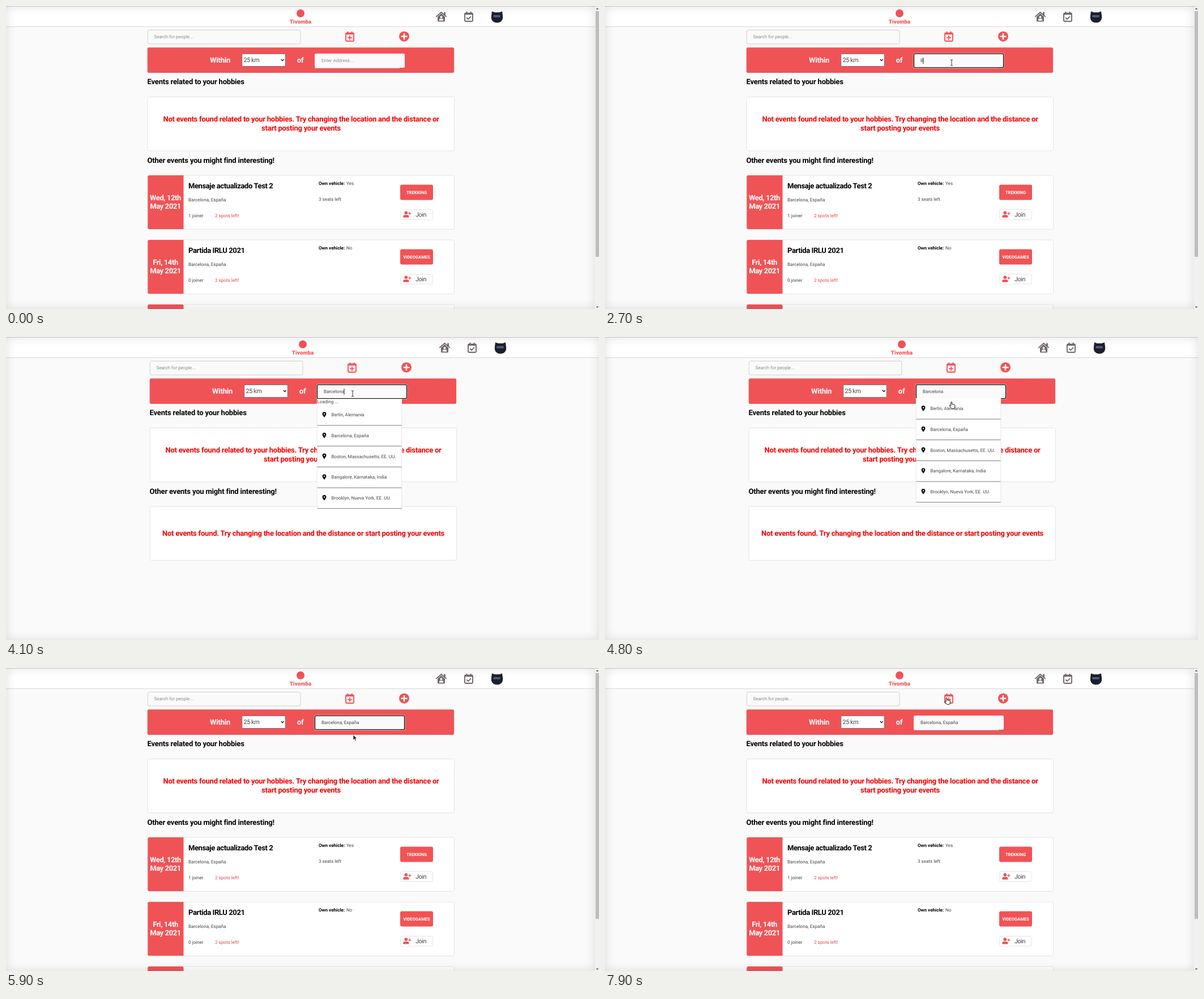
An HTML page that plays this animation: 1047x535 px, repeating every 8 s.

```html
<!DOCTYPE html>
<html lang="en">
<head>
<meta charset="utf-8">
<title>Event search</title>
<style>
  html, body { margin: 0; width: 100%; height: 100%; overflow: hidden; background: #fafafa; }
  svg { display: block; position: absolute; left: 0; top: 0; }
  #shade { position: absolute; left: 0; top: 0; height: 535px; box-shadow: inset 0 0 18px rgba(0,0,0,.13); }
  text { font-family: Roboto, Arial, sans-serif; white-space: pre; text-rendering: geometricPrecision; }
  .head, .alert, .bar { font-size: 13px; font-weight: 700; letter-spacing: -.18px; }
  .alert { fill: #f40000; letter-spacing: -.24px; }
  .bar { fill: #fff; }
  .title, .date { font-size: 13px; font-weight: 700; letter-spacing: -.4px; }
  .date { fill: #fff; }
  .small { font-size: 8.1px; fill: #444; }
  .hint { font-size: 8px; fill: #8a8a8a; }
  .left { font-size: 8.1px; fill: #f04040; }
  .own { font-size: 8.1px; font-weight: 700; }
  .tag { font-size: 7.6px; font-weight: 700; fill: #fff; }
  .big { font-size: 10.8px; fill: #444; letter-spacing: -.4px; }
  .brand { font-size: 9.6px; font-weight: 900; fill: #f05356; letter-spacing: .1px; }
</style>
</head>
<body>
<svg id="stage" width="1047" height="535" viewBox="0 0 1047 535"></svg>
<div id="shade"></div>
<script>
const LOOP = 8000, STEP = 100;
const RED = '#f05356', GREY = '#6f686a', LINE = '#dedede';

const rect = (x, y, w, h, fill, extra = '') =>
  `<rect x="${x}" y="${y}" width="${w}" height="${h}" fill="${fill}" ${extra}/>`;
const box = (x, y, w, h, fill = '#fff', stroke = LINE, r = 3) =>
  rect(x, y, w, h, fill, `stroke="${stroke}" stroke-width=".8" rx="${r}"`);
const circle = (x, y, r, fill) => `<circle cx="${x}" cy="${y}" r="${r}" fill="${fill}"/>`;
const text = (x, y, cls, str, anchor = 'start', id = '') =>
  `<text x="${x}" y="${y}" class="${cls}" text-anchor="${anchor}" ${id && `id="${id}"`}>${str}</text>`;
const path = (d, fill, extra = '') => `<path d="${d}" fill="${fill}" ${extra}/>`;
const stroke = (d, color, w) =>
  path(d, 'none', `stroke="${color}" stroke-width="${w}" stroke-linecap="round" stroke-linejoin="round"`);
const group = (id, inner) => `<g id="${id}">${inner}</g>`;
const panel = y => box(250, y, 541.5, 95.3);

// Calendar outline centred on x, y with a mark inside
const calendar = (x, y, color, mark) => `<g transform="translate(${x} ${y})">` +
  rect(-7, -6.2, 14, 14.2, 'none', `rx="1.4" stroke="${color}" stroke-width="1.9"`) +
  rect(-7, -7, 14, 3.4, color) +
  stroke('M-3.6-8.2v3M3.6-8.2v3', color, 2.1) + stroke(mark, color, 1.8) + '</g>';

function joinButton(y) {
  return box(696.5, y, 57, 17.5) +
    circle(706.3, y + 5.6, 2.9, RED) +
    path(`M701.2 ${y + 14}v-1.6q0-3 3-3h4.2q3 0 3 3v1.6z`, RED) +
    stroke(`M712.8 ${y + 4.6}v4.4M710.6 ${y + 6.8}h4.4`, RED, 1.3) +
    text(723, y + 12.3, 'big', 'Join');
}

function card(y, day, title, joiners, own, seats, tag) {
  return panel(y) +
    path(`M313.5 ${y}v95H253q-2.7 0-2.7-2.5v-90q0-2.5 2.7-2.5z`, RED) +
    text(281.5, y + 44, 'date', day, 'middle') +
    text(281.5, y + 59, 'date', 'May 2021', 'middle') +
    text(322, y + 23, 'title', title) +
    text(322, y + 45.5, 'small', 'Barcelona, España') +
    text(322, y + 74, 'small', joiners + ' joiner') +
    text(369, y + 74, 'left', '2 spots left!') +
    text(552, y + 16.5, 'own', 'Own vehicle:') +
    text(601, y + 16.5, 'small', own) +
    text(552, y + 45, 'small', seats) +
    rect(696, y + 16.5, 58, 27, RED, 'rx="3"') +
    text(725, y + 32.5, 'tag', tag, 'middle') +
    joinButton(y + 60.5);
}

const places = ['Berlín, Alemania', 'Barcelona, España', 'Boston, Massachusetts, EE. UU.',
  'Bangalore, Karnataka, India', 'Brooklyn, Nueva York, EE. UU.'];

const listItems = rect(545, 119, 150, 184.5, '#fff') + places.map((name, i) => {
  const y = 137.2 + i * 36.7;
  return path(`M558 ${y + 4.8}q-3.4-4.4-3.4-6.3a3.4 3.4 0 0 1 6.8 0q0 1.900-3.400 6.300z`, '#000') +
    circle(558, y - 1.5, 1.2, '#fff') +
    text(570.5, y + 3, 'small', name) +
    rect(545, y + 18.5, 150, .7, '#444');
}).join('') + stroke('M545.3 119v184M694.7 119v184', LINE, .7);

const nav = rect(0, 0, 1047, 37, '#fff', 'id="navBar"') +
  rect(0, 36, 1047, 1, '#d9d9d9', 'id="navLine"') + rect(0, 0, 1047, 1, '#cfcfcf');

const house = stroke('M759.800 18.600L768.500 11l8.700 7.600', GREY, 1.900) +
  rect(773.200, 10.800, 2.700, 6, GREY) +
  path('M762 18.900l6.500-5.600 6.500 5.600v7.700q0 1-1 1h-11q-1 0-1-1z', GREY) +
  circle(768.500, 19.400, 2, '#fff') +
  path('M764.700 25.700q0-3.400 2.600-3.400h2.400q2.600 0 2.600 3.400z', '#fff');

const portrait = path('M858 9.500l5 1.800h8l5-1.800 1 7.500q1 8-4 11-6 3-12 0-5-3-4-11z', '#1c1f29') +
  rect(860, 16, 13, 4, '#4c5b7c', 'rx="2"');

const navIcons = house + calendar(817, 19, GREY, 'M-3.2 2l2.3 2.3 4.3-4.5') + portrait;

const header =
  circle(520, 13, 7, RED) +
  text(520, 31.3, 'brand', 'Tivomba', 'middle') +
  box(250.2, 42.5, 269.8, 24.5, '#fafafa', '#c4c4c4') +
  text(261.5, 57, 'hint', 'Search for people...') +
  calendar(607, 54, RED, 'M-3.2 1.8h6.4M0-1.4v6.4') +
  circle(703, 53.7, 9, RED) +
  stroke('M698.5 53.7h9M703 49.2v9', '#fff', 2.4) +
  rect(249.7, 73.2, 541.4, 44.8, RED, 'rx="2.5"') +
  text(360, 99.6, 'bar', 'Within') + text(513.8, 99.6, 'bar', 'of') +
  box(416.8, 84.5, 76.4, 22, '#fff', '#666', 1) +
  text(419.5, 99.3, 'big', '25 km') +
  stroke('M486.3 94.5l2 2.1 2-2.1', '#222', 1.5);

const address =
  rect(545, 109, 150, 1, '#ddd') + rect(545, 84, 159, 25, '#fafafa', 'rx="2.5"') +
  group('ring',
    rect(544.4, 83.4, 160.2, 26.2, 'none', 'rx="2.5" stroke="#fff" stroke-width=".7"') +
    rect(545.4, 84.4, 158.2, 24.2, '#fafafa', 'rx="1.8" stroke="#101010" stroke-width="1.4"')) +
  text(557, 99, 'hint', 'Enter Address...', 'start', 'placeholder') +
  text(557, 99, 'small', '', 'start', 'typed') +
  rect(557, 91, 1, 11, '#222', 'id="caret"');

const emptyHobbies = text(249.5, 138.2, 'head', 'Events related to your hobbies') +
  panel(160.5) +
  text(521, 204.3, 'alert', 'Not events found related to your hobbies. Try changing the location and the distance or', 'middle') +
  rect(480, 207, 43, 17, '#338fe8', 'id="mark"') +
  text(521, 219.6, 'alert', 'start <tspan id="word">posting</tspan> your events', 'middle', 'advice') +
  text(249.5, 276.6, 'head', 'Other events you might find interesting!');

const cards =
  card(299, 'Wed, 12th', 'Mensaje actualizado Test 2', 1, 'Yes', '3 seats left', 'TREKKING') +
  card(413, 'Fri, 14th', 'Partida IRLU 2021', 0, 'No', '', 'VIDEOGAMES') +
  panel(527) + rect(250.3, 527, 63.2, 20, RED, 'rx="2.5"');

const nothing = panel(299) +
  text(521, 350.6, 'alert', 'Not events found. Try changing the location and the distance or start posting your events', 'middle');

const scrollBar = rect(1040, 1, 7, 534, '#f1f1f1') + rect(1041, 9, 6, 434, '#bdbdbd') +
  path('M1041.7 6h4.6l-2.3-2.7zM1041.7 530.5h4.6l-2.3 2.7z', '#555');

const cursors =
  group('arrow', path('M0 0v9.3l2.2-2 1.5 3.4 1.6-.7-1.5-3.3h3z', '#1a1a1a', 'stroke="#fff" stroke-width=".7"')) +
  group('beam', stroke('M-1.8-5h1.2l.6.6.6-.6h1.2M0-4.4v8.8M-1.8 5h1.2l.6-.6.6.6h1.2', '#222', .9)) +
  group('hand', path('M-1.3 5.5V-.4q0-1.2 1-1.2t1 1.2v3l4 .7q1.4.3 1.3 1.7l-.5 4q-.2 1.3-1.4 1.3H.6q-.8 0-1.3-.8l-2.9-3.8q-.4-1.4 1-1z',
    '#fff', 'stroke="#111" stroke-linejoin="round"'));

stage.innerHTML = rect(0, 0, 1047, 535, '#fafafa') + nav + group('navIcons', navIcons) +
  group('page', header + emptyHobbies + group('cards', cards) + group('nothing', nothing) + address +
    group('loading', rect(545, 109.5, 150, 11, '#fff') + text(545.5, 117, 'small', 'Loading ...')) +
    group('items', listItems)) +
  group('scroll', scrollBar) + cursors;

const $ = id => document.getElementById(id);
const show = (id, on) => $(id).setAttribute('visibility', on ? 'visible' : 'hidden');
const at = (table, t) => table.findLast(row => row[0] <= t);
const within = (t, a, b) => t >= a && t < b;

// time, kind, x, y
const moves = [
  [0, '', 0, 0],
  [600, 'arrow', 1010, 256], [700, 'arrow', 890, 196], [800, 'arrow', 752, 140],
  [900, 'arrow', 650, 104], [1000, 'arrow', 608, 84], [1100, 'arrow', 626, 74],
  [1400, 'arrow', 618, 78], [1500, 'beam', 602, 91], [1600, 'beam', 606, 97], [1700, 'beam', 612, 100],
  [4800, 'hand', 612, 116], [4900, 'hand', 612, 138], [5000, 'hand', 613, 158],
  [5100, 'hand', 613, 162], [5200, 'arrow', 613, 146], [5300, 'arrow', 613, 118],
  [6400, 'arrow', 588, 176], [6500, 'arrow', 538, 238], [6600, 'beam', 500, 220], [6700, 'beam', 486.5, 210],
  [7200, 'beam', 490, 206], [7300, 'beam', 502, 192], [7400, 'arrow', 520, 166], [7500, 'arrow', 546, 132],
  [7600, 'arrow', 572, 100], [7700, 'arrow', 590, 78], [7800, 'arrow', 600, 64], [7900, 'hand', 603.5, 54]
];
const typing = [
  [0, ''], [2700, 'B'], [2900, 'Ba'], [3000, 'Bar'], [3200, 'Barc'], [3400, 'Barce'], [3500, 'Barcel'],
  [3700, 'Barcelo'], [3800, 'Barcelon'], [3900, 'Barcelona'], [5200, 'Barcelona, España']
];
const caretSwitch = [[0, 0], [2000, 1], [2500, 0], [2700, 1], [4500, 0], [5000, 1], [5900, 0], [6400, 1], [6700, 0]];

const first = $('advice').getStartPositionOfChar(6).x;
$('mark').setAttribute('x', first);
$('mark').setAttribute('width', $('advice').getEndPositionOfChar(12).x - first);

function draw(t) {
  const wide = within(t, 2900, 5500);
  const width = wide ? 1047 : 1040;
  $('page').setAttribute('transform', `translate(${wide ? 4 : 0} 0)`);
  $('navIcons').setAttribute('transform', `translate(${wide ? 6 : 0} 0)`);
  $('navBar').setAttribute('width', width);
  $('navLine').setAttribute('width', width);
  $('shade').style.width = width + 'px';
  show('cards', !wide);
  show('scroll', !wide);
  show('nothing', wide);

  const open = within(t, 4100, 5200), loading = t < 4200;
  show('items', open);
  show('loading', open && loading);
  $('items').setAttribute('transform', `translate(0 ${loading ? 0 : -11})`);

  const value = at(typing, t)[1];
  $('typed').textContent = value;
  show('placeholder', !value);
  $('ring').setAttribute('opacity', within(t, 1900, 6700) ? Math.min(1, (t - 1800) / 300) : 0);
  show('caret', at(caretSwitch, t)[1]);
  $('caret').setAttribute('x', 557 + (value ? Math.round($('typed').getComputedTextLength()) - .5 : 0));

  const picked = within(t, 6900, 7100);
  show('mark', picked);
  $('word').style.fill = picked ? '#fff' : '';

  const [, kind, x, y] = at(moves, t);
  for (const id of ['arrow', 'beam', 'hand']) {
    show(id, id === kind);
    $(id).setAttribute('transform', `translate(${x} ${y})`);
  }
}

const start = performance.now();
function tick() {
  const t = (performance.now() - start) % LOOP;
  draw(Math.floor(t / STEP) * STEP);
  requestAnimationFrame(tick);
}
tick();
</script>
</body>
</html>
```
